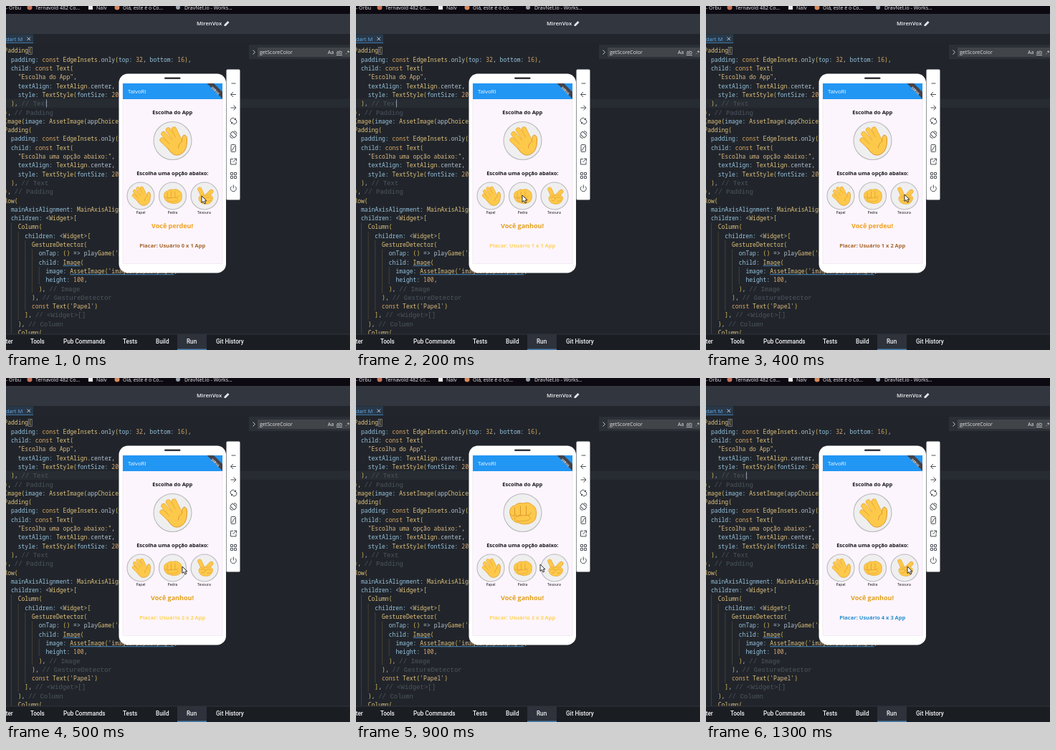
An HTML page for the animation above (1.32 s loop, 480 px wide and 480 px high).

```html
<!DOCTYPE html>
<html lang="pt">
<head>
<meta charset="utf-8">
<title>Editor e app</title>
<style>
html, body { margin: 0; width: 100%; height: 100%; overflow: hidden; background: #21252b; }
svg { display: block; width: 100vw; height: 100vh; }
text { font-family: "Open Sans", "Noto Sans", sans-serif; }
.code text { font: 500 8.07px "Noto Sans Mono", "DejaVu Sans Mono", monospace; fill: #b4c3d2; }
.code .hint { font: 9px "Liberation Mono", "DejaVu Sans Mono", monospace; fill: #4d555f; }
.kw { fill: #dca763; }
.type { fill: #e0c27d; }
.param { fill: #97c3de; }
.str { fill: #dcb982; }
.num { fill: #d9a56c; }
.br { fill: #dcbc58; }
.bar text { font-size: 7px; font-weight: 500; fill: #f0eef4; }
.menu text { font: 500 8.2px Roboto, sans-serif; fill: #f2f3f5; }
.app text { text-anchor: middle; }
.head { font-weight: 700; font-size: 7.5px; fill: #17151a; }
.label { font-size: 5.1px; fill: #111; }
.skin { fill: #fdc94a; stroke: #e8a437; stroke-width: 1; stroke-linejoin: round; }
.crease { fill: none; stroke: #dd9730; stroke-width: 1; stroke-linecap: round; }
.icons { fill: none; stroke: #4b5057; stroke-width: 1; }
</style>
</head>
<body>
<svg viewBox="0 0 480 480" preserveAspectRatio="none">
  <defs>
    <symbol id="hand" viewBox="0 0 40 40" overflow="visible">
      <g id="fingers"></g>
      <path d="M14 28L20 18L29 13Q32 18 33 21Q33 12 36.500 12Q40.500 13 40 20Q40 32 34 37Q28 42 21 39Q15 36 12 27Z" fill="#fdc94a"/>
      <path class="crease" d="M33 21Q33 12 36.500 12Q40.500 13 40 20Q40 32 34 37Q28 42 21 39Q16 36 13 30M33 21Q28 24 28 30"/>
    </symbol>
    <symbol id="fist" viewBox="0 0 40 40" overflow="visible">
      <path class="skin" d="M2 20Q2 11 9 10Q14 5 21 7Q28 4 33 9Q40 12 39 22Q39 31 32 34Q23 38 14 34Q4 33 2 20Z"/>
      <path class="crease" d="M9 13V23M17 11V23M25 11V23M3 22Q6 26 9 23Q13 26 17 23Q21 26 25 23Q29 25 32 20"/>
      <path class="skin" d="M9 26Q17 23 27 24Q33 26 29 30Q22 32 15 32Q8 31 9 26Z"/>
    </symbol>
    <symbol id="scissors" viewBox="0 0 40 40" overflow="visible">
      <g stroke-linecap="round">
        <path d="M18 23L10 6M23 22L34 11" stroke="#e8a437" stroke-width="8.600"/>
        <path d="M18 23L10 6M23 22L34 11" stroke="#fdc94a" stroke-width="7"/>
      </g>
      <path class="skin" d="M8 24Q10 17 19 19L30 18Q39 20 37 27Q33 38 21 37Q8 35 8 24Z"/>
      <path class="crease" d="M12 24Q19 20 22 25Q28 20 34 25M22 25Q20 32 14 30M26 31Q30 32 33 29"/>
    </symbol>
  </defs>

  <rect width="480" height="480" fill="#21252b"/>
  <rect width="480" height="11" fill="#0c0911"/>
  <g class="bar">
    <text x="0" y="4.500">- Orbu</text>
    <circle cx="33" cy="2" r="3.500" fill="#c9735a"/><text x="41" y="4.500">Ternavold 482 Co...</text>
    <rect x="115" y="0" width="6" height="5" fill="#eee"/><text x="126" y="4.500">Nalv</text>
    <circle cx="155" cy="2" r="3.500" fill="#d98a5c"/><text x="163" y="4.500">Olá, este é o Co...</text>
    <circle cx="240" cy="2" r="3" fill="#9aa3ad"/><text x="249" y="4.500">DravNet.io - Works...</text>
  </g>
  <rect y="11" width="480" height="28" fill="#31363f"/>
  <text x="266" y="27" font-size="7.700" font-weight="600" fill="#f2f3f6">MirenVox</text>
  <path d="M304.500 28V26L309.500 21L311.500 23L306.500 28Z" fill="#e6e8ec"/>
  <rect y="39" width="480" height="13" fill="#22262c"/>
  <rect y="39.500" width="38" height="12" fill="#29394a"/>
  <rect y="51" width="38" height="1" fill="#3f74a3"/>
  <text x="0" y="48.500" font-size="7.500" fill="#62a8e2">dart M</text>
  <path d="M29.500 43.500l4.500 4.500m0-4.500l-4.500 4.500" stroke="#d5dae0" stroke-width=".9"/>

  <rect y="129.500" width="480" height="12.500" fill="#272c32"/>
  <g class="code" id="code"></g>
  <rect id="caret" x="56" y="130.500" width="1" height="11" fill="#8a96a6"/>

  <rect x="339" y="54" width="141" height="20" fill="#2b3037"/>
  <rect x="351" y="58" width="129" height="13" fill="#414449"/>
  <path d="M344.500 61.500l3 3l-3 3" fill="none" stroke="#c3c8d0"/>
  <g fill="#e0e3e8" font-size="7">
    <text x="354" y="67.300">getScoreColor</text>
    <text x="449" y="67">Aa</text><text x="461" y="67" text-decoration="underline">ab</text><text x="474" y="67">.*</text>
  </g>

  <rect y="458" width="480" height="22" fill="#1a1d22"/>
  <rect x="239" y="458" width="41" height="22" fill="#2d323b"/>
  <rect x="239" y="478.500" width="41" height="1.500" fill="#4a7fb0"/>
  <rect y="457.500" width="480" height="1" fill="#30353d"/>
  <g class="menu" id="menu"></g>

  <rect x="307.500" y="88.500" width="19" height="182" rx="1.500" fill="#fff"/>
  <g class="icons">
    <path d="M314.500 108h6"/>
    <path d="M321 123.500h-7.500m3.500-3.500l-3.500 3.500l3.500 3.500"/>
    <path d="M313.500 142h7.500m-3.500-3.500l3.500 3.500l-3.500 3.500"/>
    <path d="M314 162a3.500 3.500 0 0 1 5.500-4.500l1 1m0-2v2h-2M321 159a3.500 3.500 0 0 1-5.500 4.500l-1-1m0 2v-2h2"/>
    <rect x="314.800" y="175.500" width="5" height="8" rx="1" transform="rotate(-45 317.300 179.500)"/>
    <path d="M318 174.500q4 0 4 4M316.500 184.500q-4 0-4-4"/>
    <rect x="314" y="193.500" width="6.500" height="10" rx="1"/><path d="M315 202l4.500-7"/>
    <path d="M317 213.500h-3.500v7.500h7.500v-3.500M318 213h3.500v3.500m0-3.500l-5 5"/>
    <path d="M313.500 232.500h3v3h-3zM318.500 232.500h3v3h-3zM313.500 237.500h3v3h-3zM318.500 237.500h3v3h-3z"/>
    <path d="M315 251.500a4 4 0 1 0 4.600 0M317.300 249.500v5"/>
  </g>

  <rect x="157.500" y="94.500" width="149.500" height="278" rx="12.500" fill="#fff"/>
  <rect x="221" y="99.500" width="22.500" height="2.500" rx="1.200" fill="#34343a"/>
  <rect x="163" y="108" width="139" height="251.500" fill="#fdf5fe" stroke="#e9e2eb" stroke-width=".6"/>
  <rect x="163" y="108" width="139" height="22" fill="#2196f3"/>
  <text x="170" y="122" font-size="7.800" fill="#f4faff">TalvoRI</text>
  <path d="M280.500 108H290L302 120V129.500Z" fill="#45434a"/>
  <text transform="translate(292.300 118) rotate(45)" y="1.500" font-size="4" font-weight="700" fill="#f4f2f2" text-anchor="middle">DEBUG</text>
  <g class="app">
    <text class="head" x="232.300" y="151">Escolha do App</text>
    <text class="head" x="232.300" y="236">Escolha uma opção abaixo:</text>
    <g fill="#efeff0" stroke="#b9b9bc" stroke-width="1.100">
      <circle cx="232.500" cy="188" r="26.500"/>
      <circle cx="188" cy="265" r="19"/><circle cx="232.500" cy="265" r="19"/><circle cx="277" cy="265" r="19"/>
    </g>
    <use id="pick" href="#hand" x="212.500" y="168" width="40" height="40"/>
    <use href="#hand" x="174.500" y="251.500" width="27" height="27"/>
    <use href="#fist" x="219" y="251.500" width="27" height="27"/>
    <use href="#scissors" x="263.500" y="251.500" width="27" height="27"/>
    <text class="label" x="188" y="290">Papel</text>
    <text class="label" x="232.500" y="290">Pedra</text>
    <text class="label" x="276.500" y="290">Tesoura</text>
    <text id="result" x="232" y="310" font-size="9" font-weight="700"></text>
    <text id="score" x="232.300" y="337" font-size="7.500" font-weight="700"></text>
  </g>
  <path id="cursor" d="M0 0V9.500L2.300 7.500L4 11L5.700 10.200L4.100 6.900H7Z" fill="#fff" stroke="#18181c" stroke-width=".9" stroke-linejoin="round"/>
</svg>
<script>
const $ = id => document.getElementById(id);
const esc = s => s.replace(/</g, "&lt;").replace(/>/g, "&gt;");
const CHAR = 4.842, LEFT = -2.7, TOP = 65.4, ROW = 12.3;

// Each line: indent in characters, code, closing label
const lines = [
  [0, "Padding("],
  [2, "padding: const EdgeInsets.only(top: 32, bottom: 16),"],
  [2, "child: const Text("],
  [4, '"Escolha do App",'],
  [4, "textAlign: TextAlign.center,"],
  [4, "style: TextStyle(fontSize: 20),"],
  [2, "),", "Text"],
  [0, "),", "Padding"],
  [0, "Image(image: AssetImage(appChoice)),"],
  [0, "Padding("],
  [2, "padding: const EdgeInsets.only(top: 32, bottom: 16),"],
  [2, "child: const Text("],
  [4, '"Escolha uma opção abaixo:",'],
  [4, "textAlign: TextAlign.center,"],
  [4, "style: TextStyle(fontSize: 20),"],
  [2, "),", "Text"],
  [0, "),", "Padding"],
  [0, "Row("],
  [2, "mainAxisAlignment: MainAxisAlignment.spaceEvenly,"],
  [2, "children: <Widget>["],
  [4, "Column("],
  [6, "children: <Widget>["],
  [8, "GestureDetector("],
  [10, "onTap: () => playGame('papel'),"],
  [10, "child: Image("],
  [12, "image: AssetImage('images/papel.png'),"],
  [12, "height: 100,"],
  [10, "),", "Image"],
  [8, "),", "GestureDetector"],
  [8, "const Text('Papel')"],
  [6, "],", "<Widget>[]"],
  [4, "),", "Column"],
  [4, "Column("]
];
const tokens = /(["'].*?["'])|(const)|([A-Z]\w+)|(\w+:)|(\d+)|([()[\]])/g;
const kinds = ["str", "kw", "type", "param", "num", "br"];

function paint(code) {
  let out = "", end = 0;
  for (const m of code.matchAll(tokens)) {
    const kind = kinds[m.slice(1).findIndex(Boolean)];
    out += esc(code.slice(end, m.index)) + `<tspan class="${kind}">${esc(m[0])}</tspan>`;
    end = m.index + m[0].length;
  }
  return out + esc(code.slice(end));
}
const colX = n => LEFT + n * CHAR;
const rowY = n => TOP + n * ROW;
const guide = (col, from, to) =>
  `<path d="M${colX(col) + .5} ${rowY(from) - 9}V${rowY(to) + 3}" stroke="#554b38" stroke-width=".7"/>`;
const underline = (col, row, n) =>
  `<path d="M${colX(col)} ${rowY(row) + 1.8}h${n * CHAR}" stroke="#4d92cf" stroke-width=".9"/>`;

$("code").innerHTML =
  guide(2, 20, 32) + guide(4, 21, 30) + guide(6, 22, 29) + guide(8, 23, 27) + guide(10, 25, 26) +
  lines.map(([col, code, label], i) =>
    `<text x="${colX(col)}" y="${rowY(i)}">${paint(code)}</text>` +
    (label ? `<text class="hint" x="${colX(col + 3)}" y="${rowY(i)}">// ${esc(label)}</text>` : "")
  ).join("") +
  underline(17, 24, 5) + underline(19, 25, 30) +
  `<rect x="${colX(7)}" y="57.500" width="5" height="10" fill="none" stroke="#8a929c" stroke-width=".7"/>`;

$("menu").innerHTML = [[-3, "tter"], [34, "Tools"], [80, "Pub Commands"], [163, "Tests"],
  [209, "Build"], [252, "Run"], [293, "Git History"]]
  .map(([x, s]) => `<text x="${x}" y="471">${s}</text>`).join("");

const stroke = (d, color, width) =>
  `<path d="${d}" stroke="${color}" stroke-width="${width}" stroke-linecap="round"/>`;
$("fingers").innerHTML = ["M5.500 19L17 30", "M7.500 10.500L20 25", "M14 5L25 21", "M22 4L29 18"]
  .map(d => stroke(d, "#e8a437", 7.2) + stroke(d, "#fdc94a", 5.8)).join("");

const results = {
  L: ["Você perdeu!", "#f2a01e"],
  W: ["Você ganhou!", "#e2a11f"],
  D: ["Empate!", "#e6a01f"]
};
// Result, user points, app points, pointer x and y; one step per 100 ms
const steps = [
  ["L", 0, 1, 273, 267], ["L", 0, 1, 252, 267], ["W", 1, 1, 232, 266], ["W", 1, 1, 255, 266],
  ["L", 1, 2, 277, 265], ["W", 2, 2, 246, 265], ["L", 2, 3, 215, 264], ["D", 2, 3, 184, 264],
  ["D", 2, 3, 220, 263], ["W", 3, 3, 257, 262], ["D", 3, 3, 277, 265], ["D", 3, 3, 298, 267],
  ["D", 3, 3, 290, 266], ["W", 4, 3, 281, 265]
];

function setText(id, text, color) {
  $(id).textContent = text;
  $(id).setAttribute("fill", color);
}
let shown = -1;
function draw(now) {
  const i = Math.floor(now % 1320 / 100);
  if (i !== shown) {
    shown = i;
    const [result, user, app, x, y] = steps[i];
    setText("result", ...results[result]);
    setText("score", `Placar: Usuário ${user} x ${app} App`,
      user > app ? "#268fd0" : user < app ? "#a5662b" : "#ffd45c");
    $("pick").setAttribute("href", i === 9 ? "#fist" : "#hand");
    $("cursor").setAttribute("transform", `translate(${x} ${y - 2})`);
    $("caret").style.opacity = i < 4 || i > 9 ? 1 : 0;
  }
}
const start = performance.now();
function tick() {
  draw(performance.now() - start);
  requestAnimationFrame(tick);
}
tick();
</script>
</body>
</html>
```
